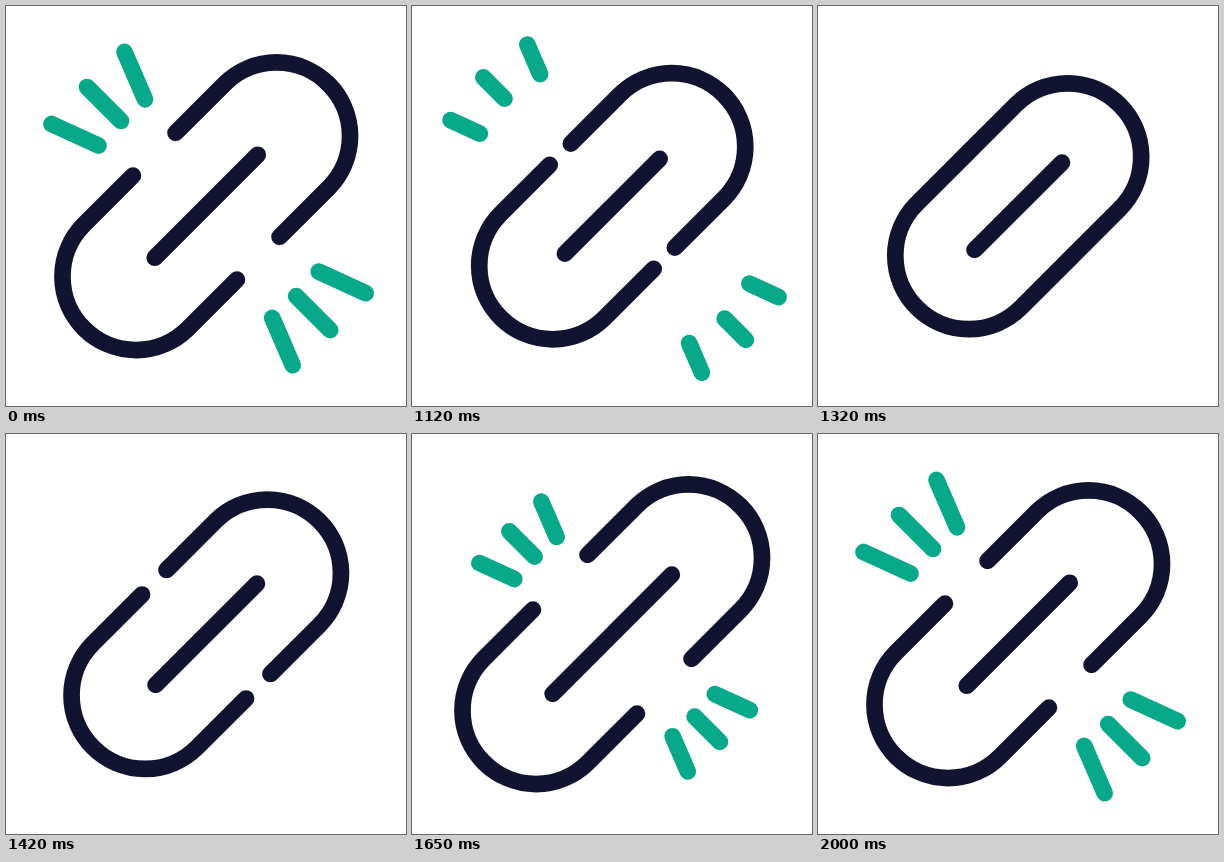
An HTML page for the animation above (2.02 s loop, 400 by 400 pixels).

```html
<!DOCTYPE html>
<html lang="en">
<head>
<meta charset="utf-8">
<title>Link</title>
<style>
  html, body { margin: 0; height: 100%; overflow: hidden; background: #fff; }
  svg { display: block; width: 100vw; height: 100vh; }
  path { fill: none; stroke: #121331; stroke-width: 16.7; stroke-linecap: round; }
  .ray { stroke: #08a88a; }
</style>
</head>
<body>
<svg viewBox="0 0 400 400">
  <path class="half" d="M-30.7-73.3 18.5-122.5A73.54 73.54 0 0 1 122.5-18.5L73.3 30.7"/>
  <path class="half" d="M30.7 73.3-18.5 122.5A73.54 73.54 0 0 1-122.5 18.5L-73.3-30.7"/>
  <path id="bar"/>
  <path class="ray"/>
  <path class="ray" transform="rotate(180 202.6 202.6)"/>
</svg>
<script>
const LOOP = 2020, HOLD = 1020, STEP = 25;
const GONE = 0.3, BACK = 29 / 60;
const MID = 200.25;

// Keys are [seconds, value]
const slide = [[0, 0], [0.25, -21.5], [0.3, -21.5], [0.567, 6], [0.78, 6], [1, 0]];
const reach = [[0, 51.5], [0.25, 43.3], [0.3, 43.3], [0.567, 59.6], [0.717, 59.6], [1, 51.5]];

// Resting ends of each ray, the point it shrinks into and the point it grows from
const rays = [
  { outer: [45.5, 118], inner: [92.5, 139.5], exit: [27, 107.7], entry: [131, 161] },
  { outer: [81, 81], inner: [115, 115], exit: [55.3, 55.3], entry: [144.7, 144.7] },
  { outer: [118.5, 46], inner: [139, 93.3], exit: [110.1, 26.2], entry: [161, 131] },
];

const halves = document.querySelectorAll('.half');
const bar = document.getElementById('bar');
const rayPaths = document.querySelectorAll('.ray');

const smooth = u => u * u * (3 - 2 * u);
const mix = (a, b, f) => a + (b - a) * f;
const mixPoint = (p, q, f) => p.map((v, i) => mix(v, q[i], f));

function track(keys, t) {
  const n = Math.max(1, keys.findIndex(k => k[0] >= t));
  const [t0, a] = keys[n - 1], [t1, b] = keys[n];
  return mix(a, b, smooth((t - t0) / (t1 - t0)));
}

function rayPath(t) {
  if (t >= GONE && t <= BACK) return '';
  const leaving = t < GONE;
  const f = leaving ? smooth(t / GONE) : ((1 - t) / (1 - BACK)) ** 3.5;
  return rays.map(({ outer, inner, exit, entry }) => {
    const focus = leaving ? exit : entry;
    return `M${mixPoint(outer, focus, f)}L${mixPoint(inner, focus, f)}`;
  }).join('');
}

function draw(t) {
  const d = track(slide, t), r = track(reach, t);
  halves[0].setAttribute('transform', `translate(${MID + d} ${MID - d})`);
  halves[1].setAttribute('transform', `translate(${MID - d} ${MID + d})`);
  bar.setAttribute('d', `M${MID - r} ${MID + r}L${MID + r} ${MID - r}`);
  rayPaths.forEach(p => p.setAttribute('d', rayPath(t)));
}

const start = performance.now();
function tick() {
  const ms = (performance.now() - start) % LOOP - HOLD;
  const step = ms < 0 ? 0 : Math.floor(ms / STEP) + 1;
  draw(Math.min(1, step * STEP / 1000));
  requestAnimationFrame(tick);
}
tick();
</script>
</body>
</html>
```
